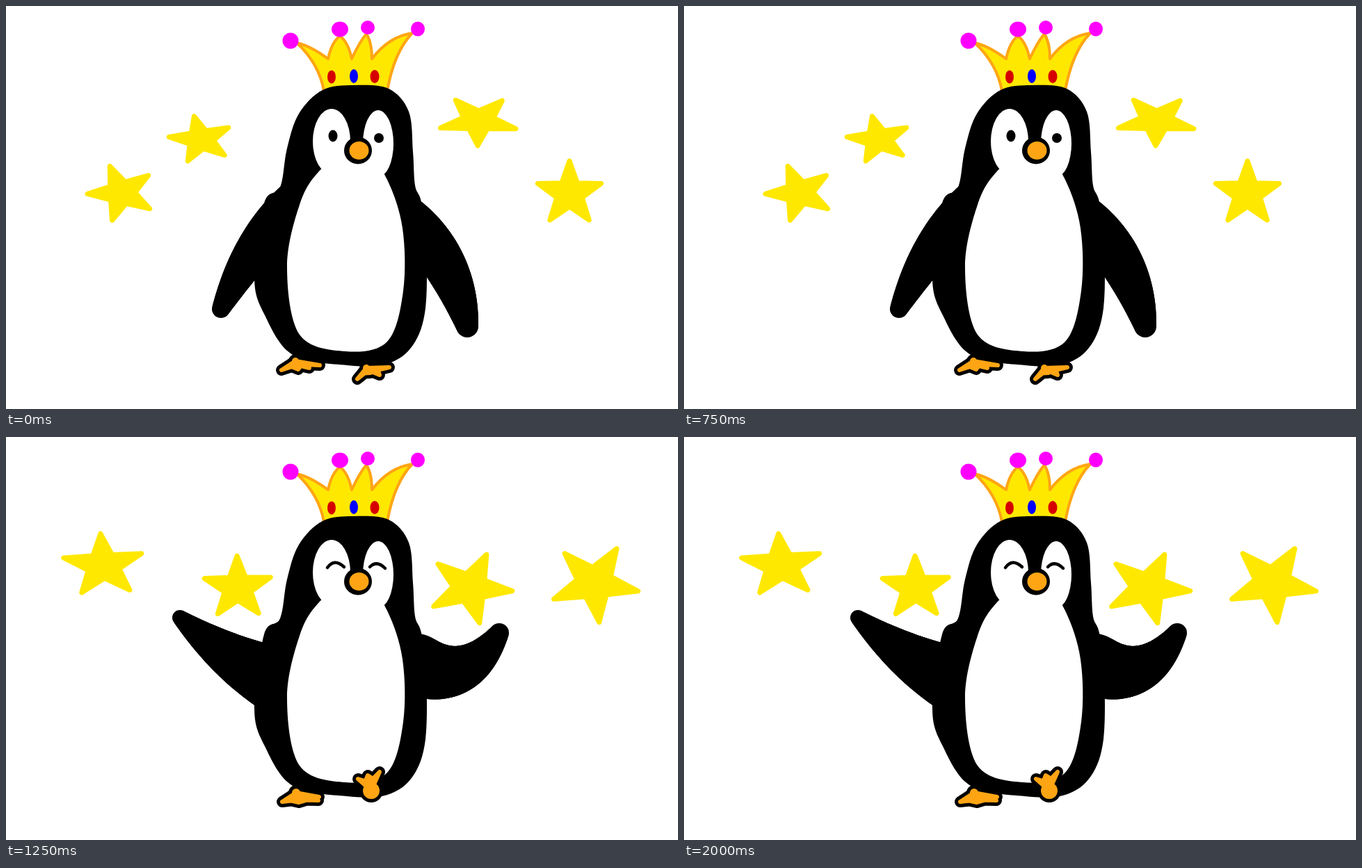
Animation of 966 by 580 pixels, one loop 2290 ms. Source, as an HTML page with a canvas:

```html
<!DOCTYPE html>
<html lang="en">
<head>
<meta charset="utf-8">
<title>Dancing penguin</title>
<style>
html, body { margin: 0; width: 100%; height: 100%; overflow: hidden; background: #fff; }
canvas { display: block; }
</style>
</head>
<body>
<canvas id="stage" width="966" height="580"></canvas>
<script>
const ctx = document.getElementById('stage').getContext('2d');
const YELLOW = '#ffe800', ORANGE = '#ffa514', RED = '#d60000', BLUE = '#00f';
const PINK = '#f0f', BLACK = '#000', WHITE = '#fff';
const LOOP = 2290, BAR = 750;

// Smooth closed path through a few key points.
function curve(text) {
  const pts = text.trim().split(/\s+/).map(p => p.split(',').map(Number));
  const at = i => pts[(i + pts.length) % pts.length];
  const path = new Path2D();
  path.moveTo(...pts[0]);
  pts.forEach((b, i) => {
    const a = at(i - 1), c = at(i + 1), d = at(i + 2);
    path.bezierCurveTo(
      b[0] + (c[0] - a[0]) / 6, b[1] + (c[1] - a[1]) / 6,
      c[0] - (d[0] - b[0]) / 6, c[1] - (d[1] - b[1]) / 6,
      c[0], c[1]);
  });
  return path;
}

const torso = curve(`500,114 550,119 579,152 585,210 588,258 597,282 604,340 603,435
  585,488 548,515 490,517 412,502 372,445 357,390 371,284 394,261 404,205 421,155 455,121`);
const belly = curve(`449,239 422,286 404,375 422,473 488,497 548,483 571,410 570,320
  548,250 515,205 494,205`);
const crown = new Path2D(`M457,122 Q450,83 418,53 Q437,57 463,76 Q468,52 480,43
  Q492,52 497,76 Q508,52 518,40 Q526,52 526,76 Q550,44 584,39 Q558,66 548,122`);
const smile = new Path2D('M462,188 Q472,174 486,187 M523,187 Q533,177 545,189');

function paint(path, color, outline, width) {
  ctx.fillStyle = color;
  ctx.fill(path);
  ctx.strokeStyle = outline;
  ctx.lineWidth = width;
  if (width) ctx.stroke(path);
}

function oval(x, y, rx, ry, color) {
  ctx.fillStyle = color;
  ctx.beginPath();
  ctx.ellipse(x, y, rx, ry, 0, 0, Math.PI * 2);
  ctx.fill();
}

function star(x, y, rx, ry, degrees) {
  const path = new Path2D();
  for (let i = 0; i < 10; i++) {
    const angle = (degrees + i * 36) * Math.PI / 180, r = i % 2 ? 0.4 : 1;
    path.lineTo(x + rx * r * Math.cos(angle), y + ry * r * Math.sin(angle));
  }
  path.closePath();
  paint(path, YELLOW, YELLOW, 7);
}

// Tapered limb: position and thickness both follow a quadratic curve.
function limb(base, bend, tip) {
  for (let t = 0; t <= 1; t += 1 / 64) {
    const [x, y, r] = base.map((v, i) =>
      (1 - t) ** 2 * v + 2 * t * (1 - t) * bend[i] + t * t * tip[i]);
    oval(x, y, r, r, BLACK);
  }
}

// Toes fan out from a round heel, with a notch between neighbours.
function foot([hx, hy, palm], toes, notch) {
  const path = new Path2D();
  path.moveTo(hx, hy);
  toes.forEach(([x, y], i) => {
    if (i) {
      const [px, py] = toes[i - 1];
      path.lineTo((x + px) / 2 * (1 - notch) + hx * notch, (y + py) / 2 * (1 - notch) + hy * notch);
    }
    path.lineTo(x, y);
  });
  path.closePath();
  for (const [color, width] of [[BLACK, 16], [ORANGE, 6]]) {
    paint(path, color, color, width);
    oval(hx, hy, palm + width / 2, palm + width / 2, color);
  }
}

const raisedFoot = () => foot([525, 509, 9], [[506, 492], [520, 487], [537, 482]], 0.3);

function mirrored(drawPart) {
  ctx.save();
  ctx.translate(976, 0);
  ctx.scale(-1, 1);
  drawPart();
  ctx.restore();
}

function drawStars(up) {
  if (up) {
    star(140, 185, 59, 46, 50);
    star(333, 217, 50, 46, 53);
    star(667, 217, 61, 52, 5);
    star(846, 210, 64, 57, 12);
  } else {
    star(166, 269, 49, 41, 34);
    star(280, 192, 46, 34, 42);
    star(679, 165, 57, 36, 19);
    star(810, 270, 48, 47, 54);
  }
}

function drawArms(up) {
  if (up) {
    limb([390, 350, 48], [320, 321, 34], [250, 260, 11]);
    limb([590, 328, 45], [660, 361, 36], [709, 282, 14]);
  } else {
    limb([416, 281, 30], [355, 340, 34], [309, 436, 13]);
    limb([572, 300, 30], [642, 363, 39], [663, 461, 16]);
  }
}

function drawCrown() {
  paint(crown, YELLOW, ORANGE, 4);
  oval(409, 50, 11.5, 11.5, PINK);
  oval(480, 33.5, 12, 11, PINK);
  oval(520, 31, 10, 10, PINK);
  oval(592, 33, 10, 10.5, PINK);
  oval(468, 102, 6, 9.5, RED);
  oval(500, 101, 6, 10, BLUE);
  oval(530, 101.5, 6.5, 9.5, RED);
}

function drawFace(happy) {
  oval(468, 195, 27, 47, WHITE);
  oval(535, 198, 22, 48, WHITE);
  paint(belly, WHITE);
  oval(506, 208, 20, 19.5, BLACK);
  oval(507.5, 208, 14, 13, ORANGE);
  if (happy) {
    ctx.strokeStyle = BLACK;
    ctx.lineWidth = 4.5;
    ctx.stroke(smile);
  } else {
    oval(470, 187, 6.5, 8.5, BLACK);
    oval(536, 190, 7, 7, BLACK);
  }
}

function drawFeet(pose) {
  if (pose === 'left') mirrored(raisedFoot);
  else if (pose === 'right') foot([417, 512, 3], [[397, 525], [421, 526], [449, 523], [450, 518]], 0.15);
  else foot([416, 511, 2], [[396, 524], [420, 523], [436, 521], [451, 517]], 0.35);

  if (pose === 'right') raisedFoot();
  else foot([518, 521, 2], [[505, 537], [524, 528], [537, 531], [551, 520]], 0.35);
}

function draw(pose) {
  const up = pose !== 'rest';
  ctx.lineJoin = ctx.lineCap = 'round';
  ctx.fillStyle = WHITE;
  ctx.fillRect(0, 0, 966, 580);
  drawStars(up);
  drawCrown();
  drawArms(up);
  paint(torso, BLACK);
  drawFace(pose === 'right');
  drawFeet(pose);
}

// Three bars of rest, left step, right step; the first bar steps a little early.
function poseAt(t) {
  const beat = t % BAR, early = t < BAR ? 40 : 0;
  if (beat < 250 - early) return 'rest';
  return beat < 500 - early ? 'left' : 'right';
}

function tick() {
  const t = performance.now() % LOOP;
  draw(poseAt(t));
  requestAnimationFrame(tick);
}
tick();
</script>
</body>
</html>
```
